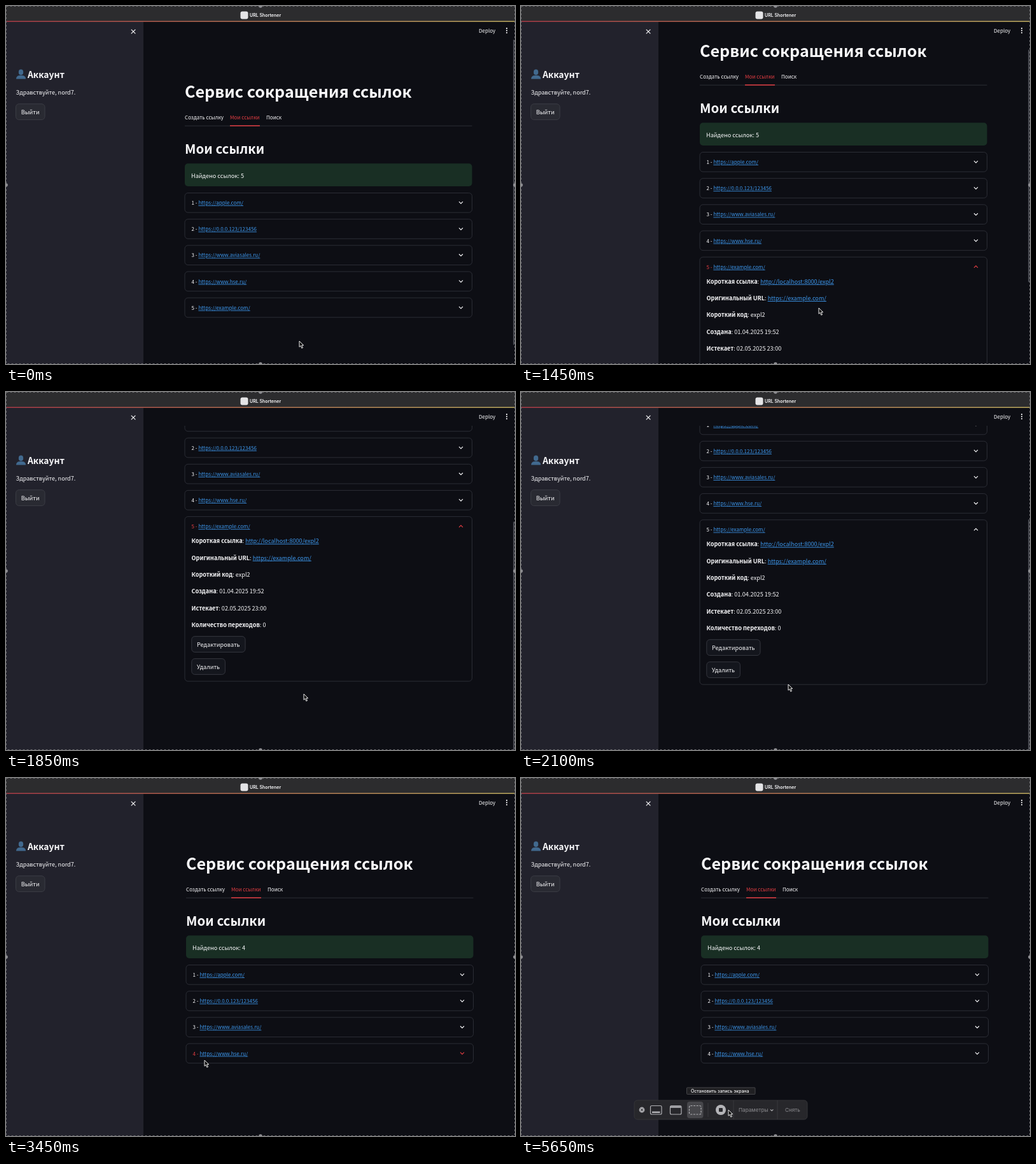
Animation, 800 px wide and 562 px high, one loop 5700 ms. Source, as an HTML page:

```html
<!DOCTYPE html>
<html lang="ru">
<head>
<meta charset="utf-8">
<title>URL Shortener</title>
<style>
html, body { margin: 0; width: 100%; height: 100%; overflow: hidden; background: #0d0e14; }
svg { display: block; }
#stage { width: 100vw; height: 100vh; }
text { font: 9.15px 'Noto Sans CJK SC', 'Noto Sans CJK JP', 'Noto Sans', sans-serif; fill: #fafafc; white-space: pre; }
.small { font-size: 8.05px; }
.bold { font-weight: 700; }
.link { fill: #3d98ee; text-decoration: underline; }
.system { font-family: Inter, 'Liberation Sans', sans-serif; }
.box { fill: none; stroke: #2b2d35; }
.button { fill: #14161d; stroke: #34363e; }
#exit .button { fill: #292a32; stroke: #3b3c44; }
.line { fill: none; stroke: #f4f4f6; stroke-width: 1.2; }
.hot > .mark, .hot > text > .mark { fill: #e23d42; }
.hot > .line, .hot > .button { stroke: #e23d42; }
</style>
</head>
<body>
<svg id="stage" viewBox="0 0 800 562"></svg>
<script>
const LOOP = 5700, STEP = 50, DELETED = 3000;
const ROW_TOP = 293.5, ROW_STEP = 41.15, OPEN = 258.5, CLOSED = 30.7;
const RED = '#e23d42';
const urls = ['https://apple.com/', 'https://0.0.0.123/123456', 'https://www.aviasales.ru/',
  'https://www.hse.ru/', 'https://example.com/'];

const text = (x, y, content, cls = '', extra = '') =>
  `<text x="${x}" y="${y}" class="${cls}" ${extra}>${content}</text>`;
const rect = (x, y, w, h, r, extra) =>
  `<rect x="${x}" y="${y}" width="${w}" height="${h}" rx="${r}" ${extra}/>`;
const path = (d, extra) => `<path d="${d}" ${extra}/>`;
const span = (cls, content) => `<tspan class="${cls}">${content}</tspan>`;
const button = (id, x, y, w, label) => `<g id="${id}">` +
  rect(x, y, w, 24.8, 5, 'class="button"') + text(x + 8.2, y + 16, label, 'mark') + '</g>';

const details = [
  ['Короткая ссылка', span('link', 'http://localhost:8000/expl2')],
  ['Оригинальный URL', span('link', 'https://example.com/')],
  ['Короткий код', 'expl2'],
  ['Создана', '01.04.2025 19:52'],
  ['Истекает', '02.05.2025 23:00'],
  ['Количество переходов', '0']
].map(([name, value], i) => text(291.5, 41.7 + i * 26.35, span('bold', name) + ': ' + value)).join('') +
  button('edit', 291.8, 188, 84.2, 'Редактировать') + button('remove', 291.8, 223, 52.6, 'Удалить');

const row = (url, i) => `<g id="row${i + 1}" transform="translate(0 ${ROW_TOP + i * ROW_STEP})">` +
  rect(281, 0, 451.5, CLOSED, 5, 'class="box"') +
  text(291.5, 18.7, span('mark', `${i + 1} - `) + span('link', url), 'small') +
  path('m-3-1.5 3 3 3-3', 'class="line" transform="translate(715 15.2)"') +
  (i === 4 ? `<svg id="body" width="800" height="0">${details}</svg>` : '') + '</g>';

const page = `<g clip-path="url(#view)"><g id="page">` +
  text(281, 144.3, 'Сервис сокращения ссылок', 'bold', 'style="font-size:25.15px"') +
  text(281, 178, 'Создать ссылку', 'small') +
  text(352, 178, 'Мои ссылки', 'small', `style="fill:${RED}"`) +
  text(409, 178, 'Поиск', 'small') +
  path('M281 188.2H732.5', 'stroke="#2b2d35"') +
  path('M352 188H399', `stroke="${RED}" stroke-width="1.6"`) +
  text(281, 231.5, 'Мои ссылки', 'bold', 'style="font-size:20.5px"') +
  rect(281, 247.3, 451.5, 35.6, 5, 'fill="#192f24"') +
  text(291, 269.5, 'Найдено ссылок: ' + '<tspan id="count">5</tspan>') +
  urls.map(row).join('') + '</g>' +
  rect(797, 25, 2.4, 507, 1.2, 'id="thumb" fill="#44464d"') + '</g>';

const sidebar = rect(0, 24, 216, 538, 0, 'fill="#22222c"') +
  path('M196.8 36.8l6.6 6.6m0-6.6l-6.6 6.6', 'class="line"') +
  '<ellipse cx="23.5" cy="104" rx="3.7" ry="4.4" fill="#41698e"/>' +
  path('M16 114.5q0-5 5-5.5h5q5 .5 5 5.5z', 'fill="#41698e"') +
  text(34, 113, 'Аккаунт', 'bold', 'style="font-size:13.8px"') +
  text(15.5, 138.7, 'Здравствуйте, nord7.') +
  button('exit', 15.5, 153.7, 45.5, 'Выйти');

const header = rect(0, 0, 800, 24, 0, 'fill="#2c2c2e"') +
  rect(0, 23.5, 800, 1.4, 0, 'fill="url(#rainbow)"') +
  rect(368.5, 8.5, 12, 12, 3, 'fill="#e4e4e6"') +
  text(383, 17.2, 'URL Shortener', 'system', 'style="font-size:7px;font-weight:600"') +
  text(743, 42, 'Deploy', 'small') +
  [35.2, 38.6, 42].map(y => `<circle cx="787" cy="${y}" r="1.1" fill="#f4f4f6"/>`).join('') +
  '<g id="running" opacity="0">' +
  path('M634 33l10 8m0-8l-10 8m-1-4h12m-11 6h10', 'class="line"') +
  text(653, 42, 'RUNNING...', 'small') + text(709, 42, 'Stop', 'small') + '</g>';

const toolbar = '<g id="toolbar">' +
  rect(178, 506, 272, 30, 5, 'fill="#27272b" stroke="#343438"') +
  '<circle cx="190" cy="521" r="4.4" fill="#a6a6aa"/>' +
  path('M188.4 519.4l3.2 3.2m0-3.2l-3.2 3.2', 'stroke="#29292d"') +
  rect(261, 508, 25.5, 26, 4, 'fill="#47474b"') +
  '<g fill="none" stroke="#b0b0b4" stroke-width="1.2">' +
  rect(203.5, 514.5, 17.5, 13.5, 2, '') + path('M206 524.7h12.5', 'stroke-width="2.5"') +
  rect(234.5, 514.5, 17.5, 13.5, 2, '') + path('M235 516.5h16.5', 'stroke-width="2.5"') +
  rect(264.5, 514.5, 18.5, 13.5, 2, 'stroke-dasharray="3 1.6"') +
  path('M392 520.3l2.2 2.2 2.2-2.2', '') + '</g>' +
  path('M294 510v22M334 506v30M403 506v30', 'stroke="#3b3b3f"') +
  '<circle cx="314" cy="521" r="8" fill="#b4b4b8"/>' + rect(311, 518, 6, 6, 1, 'fill="#29292d"') +
  text(342, 524, 'Параметры', 'system', 'style="font-size:8.2px;fill:#8c8c90"') +
  text(415, 524, 'Снять', 'system', 'style="font-size:8.2px;fill:#8c8c90"') +
  '</g><g id="tooltip">' + rect(260.5, 486, 107.5, 10.5, 1, 'fill="#202023" stroke="#454549"') +
  text(267, 493.5, 'Остановить запись экрана', 'system', 'style="font-size:6.9px;font-weight:500"') + '</g>';

const selection = rect(.5, .5, 799, 561, 0, 'fill="none" stroke="#6c6c70" stroke-dasharray="3 3"') +
  [[400, 0], [400, 562], [0, 281], [800, 281]].map(([x, y]) =>
    `<circle cx="${x}" cy="${y}" r="2.8" fill="#909094"/>`).join('');

const cursor = '<g id="cursor" stroke-linejoin="round">' +
  path('M0 0v9.3l2.1-2 1.7 3.9 1.7-.7-1.7-3.8h3z', 'id="arrow" fill="#111" stroke="#fff" stroke-width=".9"') +
  path('M-2-.5l-2-2.3 1-.8 1.6 1.6-.8-3.2 1.2-.4 1 3-.1-3.5h1.3l.3 3.5.9-3 1.2.3-.4 3.5 1-1.7 1.2.5-1.2 5-1 2.5h-4z',
    'id="hand" fill="#fff" stroke="#111" stroke-width=".5"') + '</g>';

document.getElementById('stage').innerHTML = `<defs>
  <clipPath id="view"><rect x="216" y="53" width="584" height="509"/></clipPath>
  <linearGradient id="rainbow" gradientUnits="userSpaceOnUse" x1="0" x2="800">
    <stop stop-color="#b43c48"/><stop offset="1" stop-color="#c9b563"/></linearGradient></defs>` +
  rect(0, 0, 800, 562, 0, 'fill="#0d0e14"') + page + sidebar + header + toolbar + selection + cursor;

const el = id => document.getElementById(id);
const show = (id, on) => el(id).setAttribute('visibility', on ? 'visible' : 'hidden');
const hot = (id, on) => el(id).classList.toggle('hot', on);
const clamp = v => Math.min(1, Math.max(0, v));

// Linear interpolation over [time, ...values] stops.
function along(stops, t) {
  const i = stops.findIndex(s => s[0] > t);
  if (i === 0) return stops[0].slice(1);
  if (i < 0) return stops.at(-1).slice(1);
  const a = stops[i - 1], b = stops[i], k = (t - a[0]) / (b[0] - a[0]);
  return a.slice(1).map((v, n) => v + (b[n + 1] - v) * k);
}

const pointer = [[0, 461, 526], [50, 462, 517], [200, 467, 463], [350, 467, 463], [500, 468, 474],
  [1900, 468, 474], [2100, 420, 459], [2400, 312, 443], [3950, 312, 443], [4400, 321, 474],
  [4900, 321, 474], [5300, 326, 521]];
const scrolling = [[1300, 0], [1450, 64], [1600, 160], [1750, 238], [1850, 262.5], [2050, 257.4]];

function render(t) {
  const deleted = t >= DELETED;
  const [scroll] = deleted ? [0] : along(scrolling, t);
  const open = deleted ? 0 : 1 - (1 - clamp((t - 950) / 400)) ** 4;
  const height = CLOSED + (OPEN - CLOSED) * open;
  const [x, y] = along(pointer, t);
  const hand = t >= 4400 && t < 4950;

  el('page').setAttribute('transform', `translate(${deleted ? 2 : 0} ${-scroll})`);
  el('count').textContent = deleted ? 4 : 5;
  el('row5').style.display = deleted ? 'none' : '';
  el('row5').querySelector('.box').setAttribute('height', height);
  el('row5').querySelector('.line').setAttribute('transform', `translate(715 15.2) scale(1 ${t >= 950 ? -1 : 1})`);
  el('body').setAttribute('height', open ? height : 0);
  hot('row5', t >= 150 && t < 1950);
  hot('row4', deleted && y < 448);
  hot('remove', t >= 2350 && !deleted);

  show('thumb', !deleted);
  el('thumb').setAttribute('y', 25 + scroll * .68);
  el('thumb').setAttribute('height', 507 - 142 * open);
  el('running').setAttribute('opacity', deleted ? 0 : .2 * clamp((t - 2600) / 150));

  show('toolbar', t >= 4950);
  show('tooltip', t >= 5450);
  show('arrow', !hand);
  show('hand', hand);
  el('cursor').setAttribute('transform', `translate(${x} ${y})`);
}

function tick() {
  const t = performance.now() % LOOP;
  render(t - t % STEP);
  requestAnimationFrame(tick);
}
tick();
</script>
</body>
</html>
```
